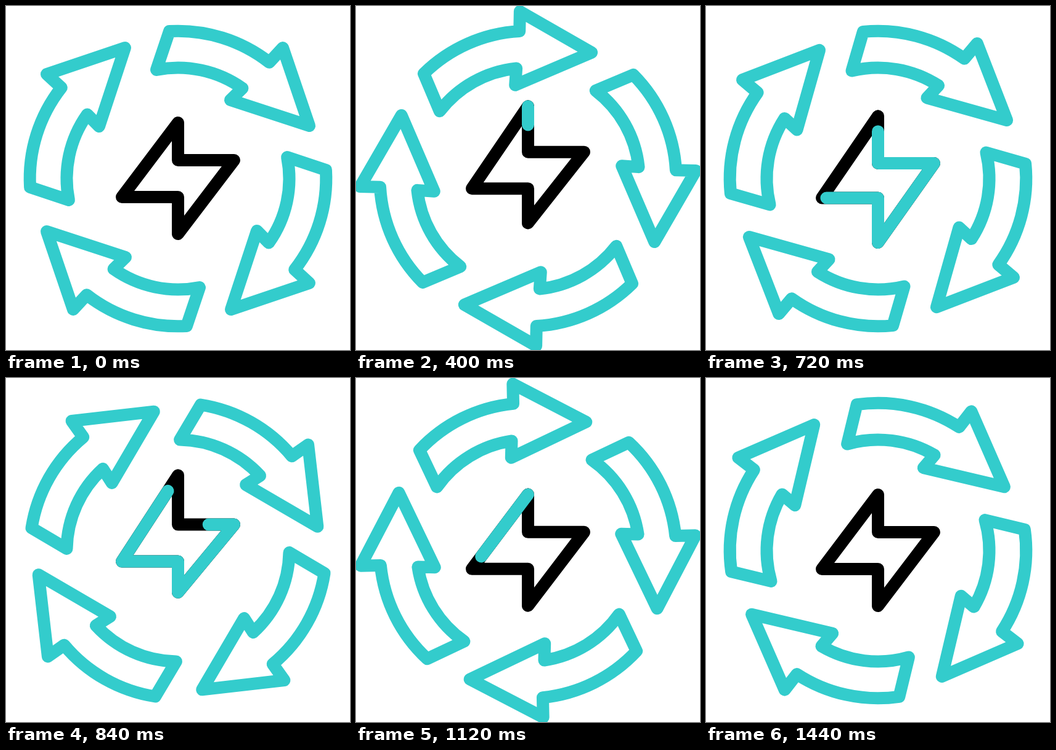
Write an HTML page with a canvas that moves like this. It is 558 by 560 pixels and loops after 1480 ms.

```html
<!DOCTYPE html>
<html lang="en">
<head>
<meta charset="utf-8">
<title>Energy cycle</title>
<style>
  html, body { margin: 0; width: 100%; height: 100%; overflow: hidden; background: #fff; }
  canvas { display: block; }
</style>
</head>
<body>
<canvas id="stage" width="558" height="560"></canvas>
<script>
const ctx = document.getElementById('stage').getContext('2d');
const LOOP = 1480, STEP = 40;
const TEAL = '#33cccc', BLACK = '#000';
const CX = 279, CY = 281;

// Vertical shifts of the bolt's top, right, left and bottom corners over time.
const BOUNCE = [
  { at: 0,    shift: [0, 0, 0, 0] },
  { at: 360,  shift: [-29.7, -16.2, -16.2, -23] },
  { at: 600,  shift: [10, 22.3, 15.3, 50.4] },
  { at: 840,  shift: [-31.5, -12.4, -12.4, -22.2] },
  { at: 1140, shift: [0, 0, 0, 0] }
];

function ease(t, from, to) {
  const x = Math.min(1, Math.max(0, (t - from) / (to - from)));
  return x * x * (3 - 2 * x);
}

function bounceAt(t) {
  const next = BOUNCE.findIndex(key => key.at > t);
  if (next < 0) return BOUNCE[BOUNCE.length - 1].shift;
  const a = BOUNCE[next - 1], b = BOUNCE[next];
  const k = ease(t, a.at, b.at);
  return a.shift.map((v, i) => v + (b.shift[i] - v) * k);
}

function drawArrow() {
  ctx.beginPath();
  ctx.arc(0, 0, 240.3, Math.atan2(-240, -14), Math.atan2(-189, 148));
  ctx.lineTo(170, -213);
  ctx.lineTo(213, -86);
  ctx.lineTo(85, -128);
  ctx.arc(0, 0, 180.5, Math.atan2(-148, 105), Math.atan2(-177, -35), true);
  ctx.closePath();
  ctx.stroke();
}

function drawBolt(t) {
  const [top, right, left, bottom] = bounceAt(t);
  const points = [
    [0, -91 + top], [0, -30 + right], [91, -30 + right],
    [0, 90 + bottom], [0, 30 + left], [-91, 30 + left], [0, -91 + top]
  ];
  const path = new Path2D();
  let length = 0;
  points.forEach(([x, y], i) => {
    path.lineTo(x, y);
    if (i) length += Math.hypot(x - points[i - 1][0], y - points[i - 1][1]);
  });
  ctx.strokeStyle = BLACK;
  ctx.stroke(path);

  // The teal line grows along the outline, then shrinks from its tail.
  const head = ease(t, 320, 920) * length;
  const tail = ease(t, 640, 1320) * length;
  if (head > tail) {
    ctx.strokeStyle = TEAL;
    ctx.setLineDash([head - tail, length * 2]);
    ctx.lineDashOffset = -tail;
    ctx.stroke(path);
    ctx.setLineDash([]);
  }
}

function draw(now) {
  const t = Math.floor(((now + 1) % LOOP) / STEP) * STEP;
  ctx.setTransform(1, 0, 0, 1, 0, 0);
  ctx.fillStyle = '#fff';
  ctx.fillRect(0, 0, 558, 560);
  ctx.translate(CX, CY);
  ctx.lineWidth = 20;
  ctx.lineCap = ctx.lineJoin = 'round';
  drawBolt(t);

  ctx.strokeStyle = TEAL;
  ctx.rotate(Math.PI * t / LOOP);
  for (let i = 0; i < 4; i++) {
    drawArrow();
    ctx.rotate(Math.PI / 2);
  }
}

function tick() {
  draw(performance.now());
  requestAnimationFrame(tick);
}
tick();
</script>
</body>
</html>
```
